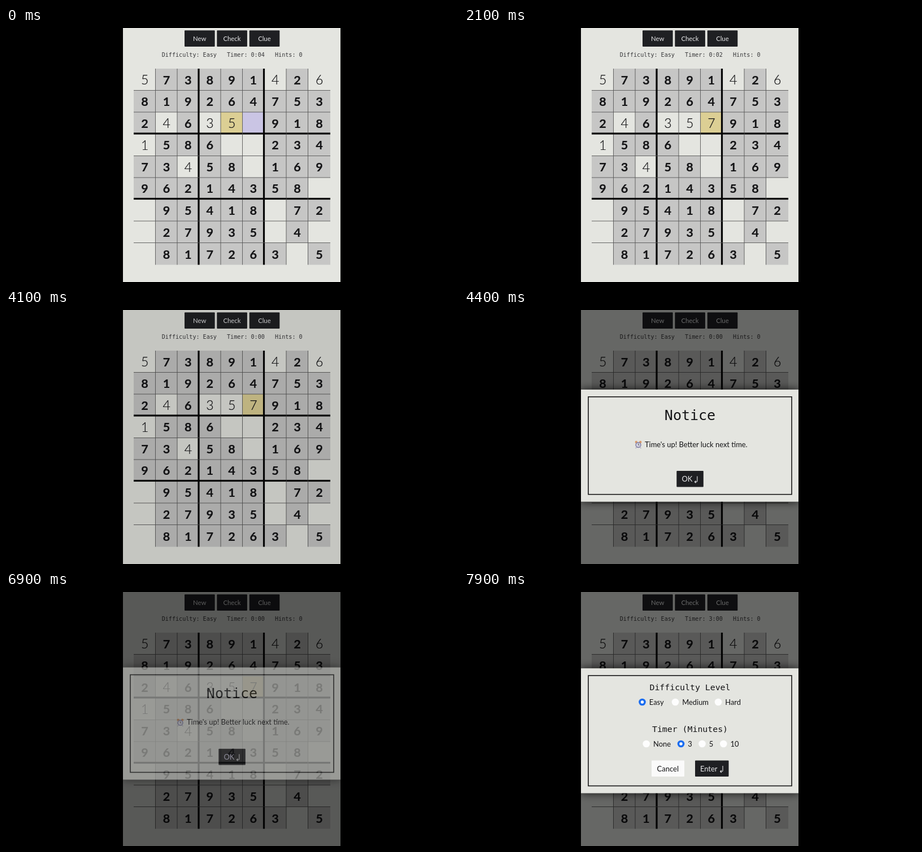
An HTML page for the animation above (8 s loop, 800 by 450 pixels).

```html
<!DOCTYPE html>
<html lang="en">
<head>
<meta charset="utf-8">
<title>Sudoku</title>
<style>
  html, body { margin: 0; width: 100%; height: 100%; overflow: hidden; background: #000; }
  svg { display: block; width: 100vw; height: 100vh; }
  text { font-family: Lato, "Open Sans", sans-serif; fill: #141416; white-space: pre; }
  .mono { font-family: "DejaVu Sans Mono", "Noto Sans Mono", monospace; }
  .mid { text-anchor: middle; }
</style>
</head>
<body>
<svg id="stage" viewBox="0 0 800 450">
  <defs>
    <filter id="shadow" x="-10%" y="-30%" width="120%" height="160%">
      <feDropShadow dx="0" dy="0" stdDeviation="8" flood-color="#000" flood-opacity=".85"/>
    </filter>
  </defs>
  <rect width="800" height="450" fill="#000"/>
  <g id="page"></g>
  <rect id="dimA" x="207" width="385" height="450" fill="#000"/>
  <g id="notice"></g>
  <rect id="dimB" x="207" width="385" height="450" fill="#000"/>
  <g id="setup"></g>
</svg>
<script>
const LOOP = 8000, STEP = 100, DIM = 0.55;
const PAPER = '#e4e5e0', GIVEN = '#c6c6c5', DARK = '#1f2023';
const YELLOW = '#dccf94', LILAC = '#cac5e4';

// Digits are givens, letters a-i are entries made by the player.
const BOARD = [
  'e73891d2f', '819264753', '2d6ce.918',
  'a586..234', '73d58.169', '96214358.',
  '.95418.72', '.27935.4.', '.817263.5'
];
const XS = [226, 264.5, 303, 341, 380, 418.5, 456.5, 496, 534.5, 574];
const YS = [72, 110.5, 149, 187, 226.5, 265, 302.5, 342, 380.5, 419.5];

const $ = id => document.getElementById(id);
const clamp = v => Math.max(0, Math.min(1, v));

function add(parent, tag, attrs, content) {
  const el = document.createElementNS('http://www.w3.org/2000/svg', tag);
  for (const k in attrs) el.setAttribute(k, attrs[k]);
  if (content !== undefined) el.textContent = content;
  return parent.appendChild(el);
}
const rect = (g, x, y, width, height, fill, more) =>
  add(g, 'rect', { x, y, width, height, fill, ...more });
const label = (g, x, y, size, str, more) =>
  add(g, 'text', { x, y, 'font-size': size, ...more }, str);
const circle = (g, cx, cy, r, fill) => add(g, 'circle', { cx, cy, r, fill });

function digit(g, col, row, str, given) {
  const size = given ? 21.6 : 23;
  const x = (XS[col] + XS[col + 1]) / 2 + 0.3;
  const y = (YS[row] + YS[row + 1]) / 2 + 0.9 + size * 0.36;
  return label(g, x, y, size, str, {
    class: 'mid', 'font-weight': given ? 700 : 300,
    stroke: '#141416', 'stroke-width': 0.2, 'stroke-linejoin': 'round'
  });
}

function enterKey(g, x, y) {
  add(g, 'path', {
    d: `M${x} ${y - 5}v8.6q0 1.4-1.6 1.4h-2.6m1.8-2.2l-2 2.2 2 2`,
    fill: 'none', stroke: '#e8e8ea', 'stroke-width': 1.1
  });
}

function dialog(g, top, h) {
  rect(g, 207, top, 385, h, PAPER, { filter: 'url(#shadow)' });
  rect(g, 220, top + 12.8, 360, h - 25.6, 'none', { stroke: '#161616', 'stroke-width': 1.6 });
}

function radio(g, x, y, str, checked) {
  circle(g, x, y, 6.3, checked ? '#1b6df0' : '#fdfdfd');
  if (checked) circle(g, x, y, 2.7, '#fff');
  label(g, x + 12.3, y + 4.6, 12.9, str);
}

function buildPage() {
  const g = $('page');
  rect(g, 207, 0, 385, 450, PAPER);
  [['New', 316], ['Check', 373.3], ['Clue', 430.7]].forEach(([str, x]) => {
    rect(g, x, 4.3, 53.6, 28.8, DARK, { rx: 1 });
    label(g, x + 26.7, 22.6, 11.3, str, { class: 'mid', style: 'fill:#e8e8ea' });
  });
  const info = (x, str) => label(g, x, 51, 10.1, str, { class: 'mono', style: 'fill:#38383a' });
  info(275.7, 'Difficulty: Easy');
  const timer = info(391, 'Timer: 0:04');
  info(476, 'Hints: 0');

  const cells = BOARD.map((line, r) => [...line].map((ch, c) => {
    const given = ch > '0' && ch <= '9';
    const box = rect(g, XS[c], YS[r], XS[c + 1] - XS[c], YS[r + 1] - YS[r], given ? GIVEN : 'none');
    if (ch !== '.') digit(g, c, r, given ? ch : ch.charCodeAt(0) - 96, given);
    return box;
  }));
  const entry = digit(g, 5, 2, '7', false);

  for (let i = 1; i < 9; i++) {
    const w = i % 3 ? 0.9 : 3.2, ink = i % 3 ? '#555' : '#050505';
    rect(g, XS[i] - w / 2, 72, w, 347.5, ink);
    rect(g, 226, YS[i] - w / 2, 348, w, ink);
  }
  return { timer, cells, entry };
}

function buildNotice() {
  const g = $('notice');
  dialog(g, 147, 198.5);
  label(g, 400, 201, 25, 'Notice', { class: 'mono mid' });
  circle(g, 304.8, 240, 2.2, '#d99a6a');
  circle(g, 312.2, 240, 2.2, '#d99a6a');
  add(g, 'path', { d: 'M305 249.5l-1.2 1.6M312 249.5l1.2 1.6', stroke: '#77759a' });
  circle(g, 308.5, 245, 5.2, '#8583a8');
  circle(g, 308.5, 245, 3.6, '#d6d5e2');
  add(g, 'path', { d: 'M308.5 242.4v2.8h2', fill: 'none', stroke: '#444', 'stroke-width': 0.8 });
  label(g, 320, 248.7, 12.9, "Time's up! Better luck next time.");
  rect(g, 376.3, 291, 47.5, 28.6, DARK, { rx: 1 });
  const ok = label(g, 385.5, 310, 12.9, 'OK');
  enterKey(g, 412.8, 305.5);
  return ok;
}

function buildSetup() {
  const g = $('setup');
  dialog(g, 135.3, 221);
  label(g, 400, 173.5, 14.85, 'Difficulty Level', { class: 'mono mid' });
  radio(g, 315.5, 195, 'Easy', true);
  radio(g, 374, 195, 'Medium');
  radio(g, 450, 195, 'Hard');
  label(g, 400, 248.3, 14.85, 'Timer (Minutes)', { class: 'mono mid' });
  radio(g, 322.7, 269, 'None');
  radio(g, 384, 269, '3', true);
  radio(g, 421.5, 269, '5');
  radio(g, 459.3, 269, '10');
  rect(g, 332, 298.4, 58, 28.6, '#fafafa', { rx: 1 });
  label(g, 360.8, 317.6, 13, 'Cancel', { class: 'mid' });
  rect(g, 409, 298.4, 59.5, 28.6, DARK, { rx: 1 });
  label(g, 418, 317.6, 12.9, 'Enter', { style: 'fill:#e8e8ea' });
  enterKey(g, 458, 313);
}

const { timer, cells, entry } = buildPage();
const okText = buildNotice();
buildSetup();

// Opening: the backdrop darkens first, then the panel drops in.
const dimIn = t => DIM * clamp(t / 400);
function place(g, opacity, y) {
  g.setAttribute('opacity', opacity);
  g.setAttribute('transform', `translate(0 ${y})`);
  g.setAttribute('display', opacity > 0 ? 'inline' : 'none');
}
const drop = t => -24 * (1 - clamp((t - 150) / 500)) ** 2;
const appear = t => clamp((t - 150) / 200);

function clock(t) {
  if (t >= 7000) return '3:00';
  return '0:0' + [1000, 2100, 3000, 4000].reduce((n, at) => n - (t >= at), 4);
}

function render(t) {
  timer.textContent = 'Timer: ' + clock(t);
  const paint = (r, c, color) => cells[r][c].setAttribute('fill', color);
  paint(2, 4, t < 300 ? YELLOW : 'none');
  paint(2, 5, t < 300 ? LILAC : YELLOW);
  paint(3, 5, t >= 1300 && t < 1500 ? LILAC : 'none');
  paint(4, 5, t >= 1500 && t < 1700 ? LILAC : 'none');
  entry.setAttribute('display', t >= 700 ? 'inline' : 'none');

  const a = t - 4000, b = t - 6800;
  const out = clamp(b / 250);
  $('dimA').setAttribute('opacity', dimIn(a) * (1 - clamp((b - 100) / 300)));
  $('dimB').setAttribute('opacity', dimIn(b));
  place($('notice'), appear(a) * (1 - out), drop(a) - 33 * out);
  place($('setup'), appear(b), drop(b));
  okText.style.fill = t >= 5700 ? '#d4d0ec' : '#e8e8ea';
}

function tick(now) {
  render(Math.floor((now % LOOP) / STEP) * STEP);
  requestAnimationFrame(tick);
}
render(0);
requestAnimationFrame(tick);
</script>
</body>
</html>
```
